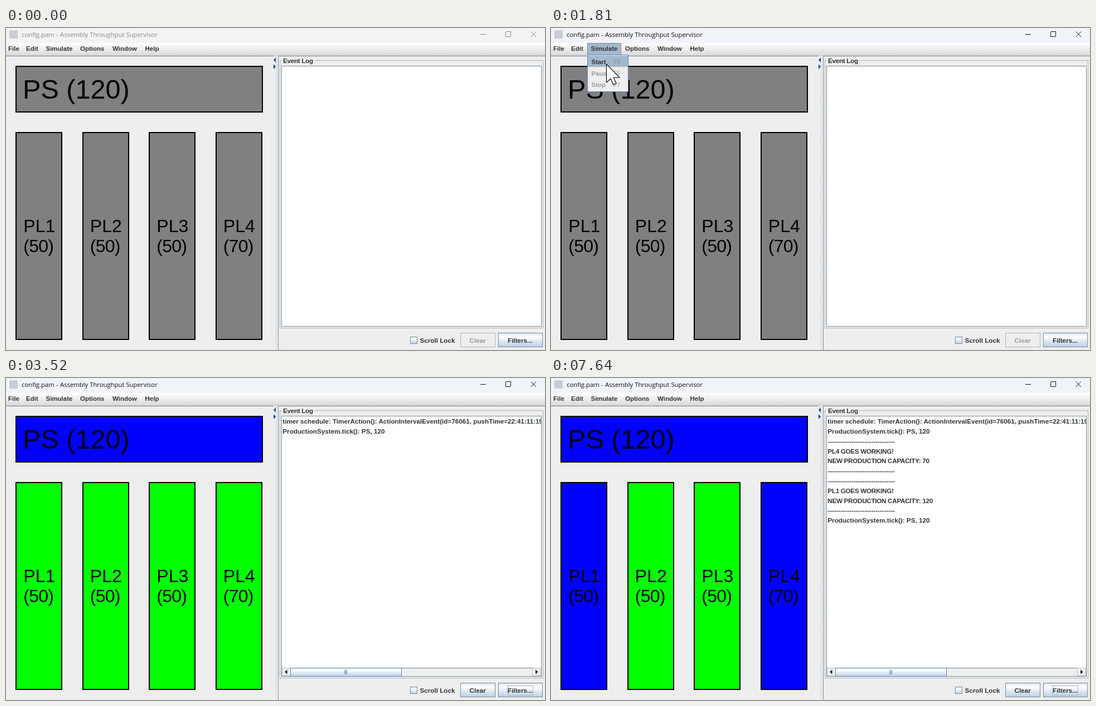
An HTML page that plays this animation: 967 px wide and 579 px high, repeating every 8000 ms.

```html
<!DOCTYPE html>
<html lang="en">
<head>
<meta charset="utf-8">
<title>config.pam</title>
<style>
  html, body { margin: 0; width: 100%; height: 100%; overflow: hidden; background: #eee; }
  svg { display: block; width: 967px; height: 579px; }
  rect, line { shape-rendering: crispEdges; }
  text { font: bold 11.7px "Liberation Sans", Arial, sans-serif; fill: #333; white-space: pre; }
  .title { font: 11.3px "Open Sans", "Noto Sans", sans-serif; }
  .menu { font-size: 11.5px; }
  .key { font: 10px "Liberation Sans", Arial, sans-serif; fill: #7a8a99; }
  .caps { letter-spacing: -.3px; }
  .off { fill: #999; }
  .big { font: 48.6px "Liberation Sans", Arial, sans-serif; fill: #000; }
  .mid { font: 32px "Liberation Sans", Arial, sans-serif; fill: #000; }
  .tight { letter-spacing: -.8px; }
</style>
</head>
<body>
<svg id="stage" viewBox="0 0 967 579" xmlns="http://www.w3.org/2000/svg">
  <defs>
    <linearGradient id="bar" x2="0" y2="1">
      <stop stop-color="#fff"/><stop offset="1" stop-color="#dadada"/>
    </linearGradient>
    <linearGradient id="ocean" x2="0" y2="1">
      <stop stop-color="#dde8f3"/><stop offset=".3" stop-color="#fff"/>
      <stop offset=".6" stop-color="#dde8f3"/><stop offset="1" stop-color="#b8cfe5"/>
    </linearGradient>
    <pattern id="bumps" width="4" height="4" patternUnits="userSpaceOnUse">
      <path d="M0 0h1v1h-1zM2 2h1v1h-1z" fill="#fff"/>
      <path d="M1 1h1v1h-1zM3 3h1v1h-1z" fill="#8a98a6"/>
    </pattern>
    <clipPath id="logClip"><rect x="495" y="69" width="465" height="452"/></clipPath>
  </defs>
</svg>
<script>
const LOOP = 8000;
const EDGE = '#7a8a99', GRAY = '#808080', BLUE = '#00f', GREEN = '#0f0';
const stage = document.getElementById('stage');

function add(parent, tag, attrs, content) {
  const el = document.createElementNS(stage.namespaceURI, tag);
  for (const key in attrs) el.setAttribute(key, attrs[key]);
  if (content) el.textContent = content;
  return parent.appendChild(el);
}
const group = (parent = stage) => add(parent, 'g', {});
const fill = (p, x, y, width, height, color) => add(p, 'rect', { x, y, width, height, fill: color });
const box = (p, x, y, w, h, color, stroke = EDGE) =>
  add(p, 'rect', { x: x + .5, y: y + .5, width: w - 1, height: h - 1, fill: color, stroke });
const label = (p, x, y, str, cls = '') => add(p, 'text', { x, y, class: cls }, str);
const path = (p, d, color, stroke = 'none', width = 1) =>
  add(p, 'path', { d, fill: color, stroke, 'stroke-width': width });
const show = (el, on) => { el.style.display = on ? '' : 'none'; };

// Title bar
const titleBar = fill(stage, 0, 0, 967, 27, '#f3f3f3');
fill(stage, 6, 4, 15, 15, '#c9ccd2');
const caption = group();
label(caption, 28, 16, 'config.pam -', 'title');
label(caption, 97, 16, 'Assembly Throughput Supervisor', 'title');
const winButtons = group();
path(winButtons, 'M851 11.5h10', 'none', 'inherit');
add(winButtons, 'rect', { x: 896.5, y: 6.5, width: 9, height: 9, rx: 1.5, fill: 'none' });
path(winButtons, 'M941.5 6.5l9.5 9.5M951 6.5l-9.5 9.5', 'none', 'inherit');

// Menu bar
fill(stage, 0, 27, 967, 22, 'url(#bar)');
fill(stage, 0, 49, 967, 1, '#ccc');
const menuMark = box(stage, 65, 27, 61, 22, '#a3b8cc');
[['File', 4], ['Edit', 36], ['Simulate', 71.5], ['Options', 133], ['Window', 191], ['Help', 249.5]]
  .forEach(([name, x]) => label(stage, x, 41, name, 'menu'));

// Split pane
fill(stage, 0, 50, 480, 1, EDGE);
fill(stage, 482, 51, 5, 528, 'url(#bumps)');
path(stage, 'M484 53v9l-4-4.500z', '#1f4a80');
path(stage, 'M480 65v9l4-4.500z', '#1f4a80');
fill(stage, 488, 50, 479, 1, EDGE);
fill(stage, 488, 50, 1, 529, EDGE);

// Production blocks
function block(x, y, w, h) {
  return add(stage, 'rect', { x: x + 1, y: y + 1, width: w - 2, height: h - 2, stroke: '#000', 'stroke-width': 2 });
}
const system = block(17, 68, 444, 84);
label(stage, 30, 126.5, 'PS (120)', 'big');
const lines = [50, 50, 50, 70].map((capacity, i) => {
  const rect = block(Math.floor(17.6 + 119.5 * i), 187, 84, 374);
  const x = 31.3 + 119.5 * i;
  label(stage, x, 367, 'PL' + (i + 1), 'mid');
  label(stage, x, 403, `(${capacity})`, 'mid tight');
  return rect;
});

// Event log
box(stage, 491, 58, 473, 482, 'none', '#aab2ba');
fill(stage, 495, 56, 58, 8, '#eee');
label(stage, 497, 63, 'Event Log', 'caps');
box(stage, 494, 68, 467, 469, '#fff');
const log = group();
log.setAttribute('clip-path', 'url(#logClip)');
const dashes = '-'.repeat(31);
const tick = 'ProductionSystem.tick(): PS, 120';
const working = (name, total) =>
  [dashes, name + ' GOES WORKING!', 'NEW PRODUCTION CAPACITY: ' + total, dashes];
const events = [
  [2480, ['timer schedule: TimerAction(): ActionIntervalEvent(id=76061, pushTime=22:41:11:195']],
  [3520, [tick]],
  [3910, working('PL4', 70)],
  [3980, working('PL1', 120)],
  [7640, [tick]]
];
const rows = [];
for (const [at, texts] of events) {
  for (const str of texts) {
    const cls = /^(PL|NEW)/.test(str) ? 'caps' : '';
    rows.push({ at, el: label(log, 496.3, 82.3 + 17.78 * rows.length, str, cls) });
  }
}

// Scroll bar
const scroll = group();
box(scroll, 494, 521, 467, 16, '#eee');
box(scroll, 495, 521, 16, 15, '#eee', '#b8c4d0');
box(scroll, 944, 521, 16, 15, '#eee', '#b8c4d0');
path(scroll, 'M504.500 524.500v8l-4.500-4z', '#222');
path(scroll, 'M950 524.500v8l4.500-4z', '#222');
box(scroll, 510, 521, 200, 16, 'url(#ocean)', '#6382bf');
for (let i = 0; i < 3; i++) fill(scroll, 607 + 2 * i, 525, 1, 8, '#6382bf');

// Footer
box(stage, 725, 555, 13, 13, 'url(#ocean)');
label(stage, 742.5, 566, 'Scroll Lock');
const clearButton = box(stage, 815, 548, 63, 26, '#eee');
const clearText = label(stage, 831.5, 566, 'Clear');
box(stage, 883, 548, 80, 26, 'url(#ocean)');
label(stage, 900, 566, 'Filters...');
const focus = box(stage, 899, 553, 47, 18, 'none', '#a3b8cc');

// Drop-down menu
const popup = group();
box(popup, 65, 48, 74, 67, '#eee', '#6382bf');
const hover = fill(popup, 66, 50, 72, 20, '#a3b8cc');
['Start', 'Pause', 'Stop'].forEach((name, i) => {
  const y = 65 + 20.7 * i;
  const off = i ? ' off' : '';
  label(popup, 72.5, y, name, 'menu' + off);
  label(popup, 112.5, y - .5, 'F' + (5 + i), 'key' + off);
});

// Pointer
const ring = add(stage, 'circle', { r: 24.5, fill: '#dcd614', 'fill-opacity': .72 });
const pointer = path(stage, 'M.5 1V34L8 27L12.700 38L18 35.700L13.300 25H24z', '#fff', '#000', 1.1);

const slow = Array.from({ length: 13 }, (_, i) =>
  i < 6 ? [81 + 5 * i / 6, 31 + 11 * i / 6] : [86 + 13 * (i - 6) / 6, 42 + 22 * (i - 6) / 6]);
const moves = [
  { at: 70, step: 66.5, points: [[706, 436], [650, 392], [550, 315], [430, 222], [290, 112],
    [240, 80], [180, 55], [125, 38], [92, 32], [81, 31]] },
  { at: 1030, step: 63.3, points: slow },
  { at: 2680, step: 67, points: [[90, 60], [66, 54], [38, 50], [11, 46]] }
];

function pointerAt(t) {
  if (t < 70 || t >= 2948) return null;
  const { at, step, points } = moves.filter(m => t >= m.at).pop();
  return points[Math.min(points.length - 1, Math.floor((t - at) / step))];
}

function draw(t) {
  const active = t >= 1030;
  const menuOpen = active && t < 2480;
  const running = t >= 2480;
  const clicking = (t >= 1030 && t < 1095) || (t >= 2420 && t < 2480);

  titleBar.setAttribute('fill', active ? '#f0f4f9' : '#f3f3f3');
  for (const el of caption.children) el.style.fill = active ? '#111' : '#888';
  winButtons.style.stroke = active ? '#111' : '#888';

  show(menuMark, menuOpen);
  show(popup, menuOpen);
  show(hover, t >= 1560);

  system.setAttribute('fill', running ? BLUE : GRAY);
  const starts = [3980, LOOP, LOOP, 3910];
  lines.forEach((el, i) => el.setAttribute('fill', !running ? GRAY : t >= starts[i] ? BLUE : GREEN));

  rows.forEach(row => show(row.el, t >= row.at));
  show(scroll, running);
  show(focus, running);
  clearButton.setAttribute('fill', running ? 'url(#ocean)' : '#eee');
  clearButton.setAttribute('stroke', running ? EDGE : '#b4b4b4');
  clearText.setAttribute('class', running ? '' : 'off');

  const pos = pointerAt(t);
  show(pointer, pos);
  show(ring, pos && clicking);
  if (pos) {
    pointer.setAttribute('transform', `translate(${pos})`);
    ring.setAttribute('transform', `translate(${pos})`);
  }
}

const origin = performance.now();
function loop() {
  draw((performance.now() - origin) % LOOP);
  requestAnimationFrame(loop);
}
loop();
</script>
</body>
</html>
```
